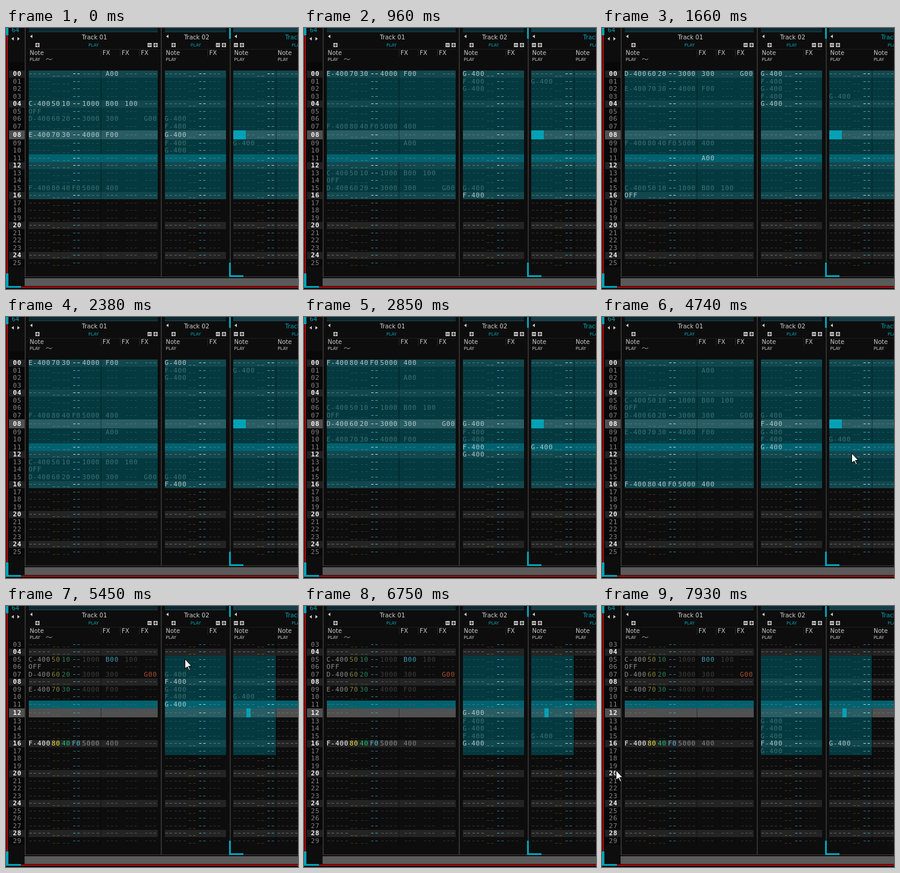
Recreate the animation shown at these times as an HTML page with a canvas. Size 487 by 436 pixels, loop 8000 ms.

```html
<!DOCTYPE html>
<html lang="en">
<head>
<meta charset="utf-8">
<title>Pattern rotation</title>
<style>
  html, body { margin: 0; width: 100%; height: 100%; overflow: hidden; background: #0d0d0d; }
  canvas { display: block; }
</style>
</head>
<body>
<canvas id="stage" width="487" height="436"></canvas>
<script>
const ctx = document.getElementById('stage').getContext('2d');
const LOOP = 8000, TICK = 118.25, ROW = 12.5, CHAR = 7.35;
const MONO = '"DejaVu Sans Mono", monospace';
const SANS = '"DejaVu Sans", sans-serif';
const CYAN = '#00a3b8', RED = '#c00808', LABEL = '#c8c8c8';

// Per column kind: width, characters, [dim, lit] ink, [dim, lit] empty mark
const kinds = {
  note: { w: 38.5, n: 5, ink: ['#8c8c8c', '#ffffff'], mark: ['#343434', '#686868'] },
  vol: { w: 17, n: 2, ink: ['#85823c', '#f5e83c'], mark: ['#40361a', '#6a5a22'] },
  pan: { w: 17, n: 2, ink: ['#2a8258', '#18c070'], mark: ['#1a3826', '#286040'] },
  delay: { w: 17, n: 2, ink: ['#3a8ca8', '#58bfe0'], mark: ['#2e7488', '#409cb4'] },
  num: { w: 39, n: 4, ink: ['#3e3e3e', '#8c8c8c'], mark: ['#2c2c2c', '#555555'] },
  fx: { w: 32, n: 3, ink: ['#3e3e3e', '#808080'], mark: ['#2c2c2c', '#555555'] }
};
const fxInks = { B00: '#429ab4', G00: '#b25030' };

function makeTrack(title, left, right, split, names, notes) {
  let x = left - 0.5;
  const cols = names.split(' ').map(kind => {
    const col = { kind, x };
    x += kinds[kind].w;
    return col;
  });
  return { title, left, right, split, cols, notes };
}

const alternating = {};
for (let row = 6; row <= 10; row++) alternating[row] = [row % 2 ? 'F-400' : 'G-400'];

const tracks = [
  makeTrack('Track 01', 38, 253, 158, 'note vol pan delay num fx fx fx', {
    0: ['', '', '', '', '', 'A00'],
    4: ['C-400', '50', '10', '', '1000', 'B00', '100'],
    5: ['OFF'],
    6: ['D-400', '60', '20', '', '3000', '300', '', 'G00'],
    8: ['E-400', '70', '30', '', '4000', 'F00'],
    15: ['F-400', '80', '40', 'F0', '5000', '400']
  }),
  makeTrack('Track 02', 265, 367, 0, 'note vol delay fx', alternating),
  makeTrack('Track 03', 379, 590, 450, 'note vol delay note', { 9: ['G-400'] })
];

const mod = (a, n) => ((a % n) + n) % n;

// Rows moved by a held key: one at once, then auto-repeat after a pause.
function held(n, start, limit) {
  if (n < start) return 0;
  return n < start + 2 ? 1 : Math.min(limit, Math.floor(3 + 2.5 * (n - start - 2)));
}

// Pointer strokes as key points [tick, x, y]
const strokes = [
  [[34, 478, 2], [40, 416, 227], [42, 403, 238], [46, 298, 88], [48, 296, 87]],
  [[64, 295, 87], [66, 1, 262], [67, 23, 274]]
];

function pointerAt(n) {
  for (const path of strokes) {
    for (let i = 1; i < path.length; i++) {
      const [n0, x0, y0] = path[i - 1], [n1, x1, y1] = path[i];
      if (n < n0 || n > n1) continue;
      const k = (n - n0) / (n1 - n0);
      return [Math.round(x0 + (x1 - x0) * k), Math.round(y0 + (y1 - y0) * k)];
    }
  }
  return null;
}

function box(x, y, w, h, color) {
  ctx.fillStyle = color;
  ctx.fillRect(x, y, w, h);
}

function text(s, x, y, color, size, align = 'left') {
  ctx.font = `${size}px ${SANS}`;
  ctx.textAlign = align;
  ctx.fillStyle = color;
  ctx.fillText(s, x, y);
}

function mono(s, x, y, color, weight = '') {
  ctx.font = `${weight} 11px ${MONO}`;
  ctx.textAlign = 'left';
  ctx.letterSpacing = `${CHAR - 6.62}px`;
  ctx.fillStyle = color;
  ctx.fillText(s, x, y);
  ctx.letterSpacing = '0px';
}

function outline(points) {
  ctx.beginPath();
  points.forEach(([x, y]) => ctx.lineTo(x, y));
  ctx.closePath();
}

function arrow(x, y, d) {
  outline([[x - 2 * d, y], [x + 2 * d, y - 3], [x + 2 * d, y + 3]]);
  ctx.fillStyle = LABEL;
  ctx.fill();
}

function button(x, plus) {
  box(x, 25, 7, 7, '#b4b4b4');
  box(x + 1, 28, 5, 1, '#111');
  if (plus) box(x + 3, 26, 1, 5, '#111');
}

function header({ title, left, right, cols }, index) {
  const mid = (left + right) / 2;
  box(left, 0, right - left, 6, index === 2 ? '#123f4b' : '#0b2a31');
  box(left, 6, right - left, 1, '#24444c');
  box(left, 35, right - left, 1, '#1e1e1e');
  arrow(left + 4, 14, 1);
  text(title, mid + 2, 19, index === 2 ? CYAN : '#d0d0d0', 10, 'center');
  text('PLAY', mid + 0.5, 31, CYAN, 7.3, 'center');
  button(left + 11, true);
  button(index === 2 ? left + 1 : right - 17, false);
  button(right - 7, true);
  for (const { kind, x } of cols) {
    if (kind === 'note') {
      text('Note', x + 2, 45, LABEL, 10);
      text('PLAY', x + 2, 55, LABEL, 7.3);
    } else if (kind === 'fx') {
      const fx = index ? x + 2 : x - 5;
      box(fx - 3, 36, 1, 12, '#252525');
      text('FX', fx, 45, LABEL, 10);
    }
  }
}

function frame() {
  box(0, 0, 487, 436, '#0d0d0d');
  box(5, 57, 26, 342, '#080808');
  box(1, 0, 2, 433, RED);
  box(1, 432, 486, 2, RED);
  for (const x of [31, 258, 373]) box(x, 0, 2, 415, '#303030');
  box(31, 415, 456, 1, '#3a3a3a');
  box(31, 418, 456, 13, '#5a5a5a');

  for (const y of [-11, 410]) box(0, y, 4, 23, CYAN);
  box(0, 431, 25, 3, CYAN);
  for (const y of [-6, 392]) box(372, y, 3, 24, CYAN);
  box(372, 413, 24, 3, CYAN);

  text('64', 9.5, 7, CYAN, 10);
  arrow(11, 18, 1);
  arrow(21, 18, -1);
  tracks.forEach(header);

  ctx.beginPath();
  ctx.moveTo(67, 53);
  ctx.bezierCurveTo(70, 47, 73, 57, 77, 51);
  ctx.strokeStyle = '#b0b0b0';
  ctx.lineWidth = 1;
  ctx.stroke();
}

// The row under the edit cursor (slot 8) is taller than the rest.
function slotBox(p) {
  if (p === 8) return [171, 15];
  return [p < 8 ? 70.6 + ROW * p : 186 + ROW * (p - 9), ROW];
}

function rowFill(chosen, beat, playing, current) {
  if (current) return chosen ? '#295c63' : '#505050';
  if (playing) return '#00626f';
  if (beat) return chosen ? '#13474e' : '#242424';
  return chosen ? '#04393f' : null;
}

function cell(value, { kind, x }, y, chosen, lit) {
  const k = lit ? 1 : 0;
  const { n, ink, mark } = kinds[kind];
  if (value) {
    mono(value, x, y + 4, chosen ? ['#3f7275', '#b2c8ca'][k] : fxInks[value] || ink[k]);
    return;
  }
  let color = mark[k];
  if (chosen) color = kind === 'delay' ? ['#4f9ca6', '#b4d2d6'][k] : ['#1c5157', '#497a7f'][k];
  const drop = kind === 'vol' || kind === 'pan' ? 4 : 0;
  for (let i = 0; i < n; i++) box(Math.round(x + 1.6 + CHAR * i), y + drop, 4, 1, color);
}

function draw(t) {
  const n = Math.floor((t - 4) / TICK);
  const shift = held(n, 18, 17) - held(n, 4, 28) - held(n, 28, 5);
  const turn = -held(n, 53, 20);
  const dragged = n >= 42;
  const scroll = dragged ? 4 : 0;

  const first = dragged ? Math.max(5, 17 - 3 * (n - 42)) : 0;
  const last = dragged ? 17 : 16;
  const left = dragged ? (n < 44 ? 379 : 265) : 38;
  const right = dragged ? 450 : 487;

  const lookup = (index, row) => {
    if (dragged && index > 0 && row >= 5 && row <= 17) row = 5 + mod(row - 5 - turn, 13);
    return row > 16 ? [] : tracks[index].notes[mod(row - shift, 17)] || [];
  };

  frame();
  for (let p = -1; p < 26; p++) {
    const row = p + scroll;
    if (row < 0) continue;
    const [top, height] = slotBox(p);
    const y = Math.floor(top + height / 2);
    const y0 = Math.round(top);
    const h = Math.round(top + height) - y0;
    const beat = row % 4 === 0, playing = row === 11, current = p === 8;
    const lit = beat || playing || current;
    const within = x => row >= first && row <= last && x >= left && x < right;

    if (current) box(5, y0, 26, h, '#505050');
    else if (beat) box(5, y0, 26, h, '#202020');
    mono(String(row).padStart(2, '0'), 11.5, y + 4, beat || current ? '#f0f0f0' : '#858585', beat ? 'bold' : '');

    tracks.forEach((track, index) => {
      const cut = track.split || track.right;
      for (const [a, b] of [[track.left, cut], [cut, track.right]]) {
        const fill = rowFill(within(a), beat, playing, current);
        if (fill) box(a, y0, b - a, h, fill);
      }
      if (track.split && !playing) box(cut, y0, 1, h, 'rgba(0, 0, 0, 0.4)');
      if (current && index === 2) box(dragged ? 401 : 379, y0, dragged ? 7 : 21, h, CYAN);
      const values = lookup(index, row);
      track.cols.forEach((col, i) => cell(values[i], col, y, within(col.x + 2), lit));
    });
  }

  const tip = pointerAt(n);
  if (tip) {
    const edge = [[0, 0], [0, 16], [4, 13], [7, 19], [9, 18], [6, 12], [11, 12]];
    outline(edge.map(([x, y]) => [tip[0] + x + 0.5, tip[1] + y + 0.5]));
    ctx.fillStyle = '#fff';
    ctx.fill();
    ctx.strokeStyle = '#000';
    ctx.stroke();
  }
}

function tick() {
  draw(performance.now() % LOOP);
  requestAnimationFrame(tick);
}
tick();
</script>
</body>
</html>
```
